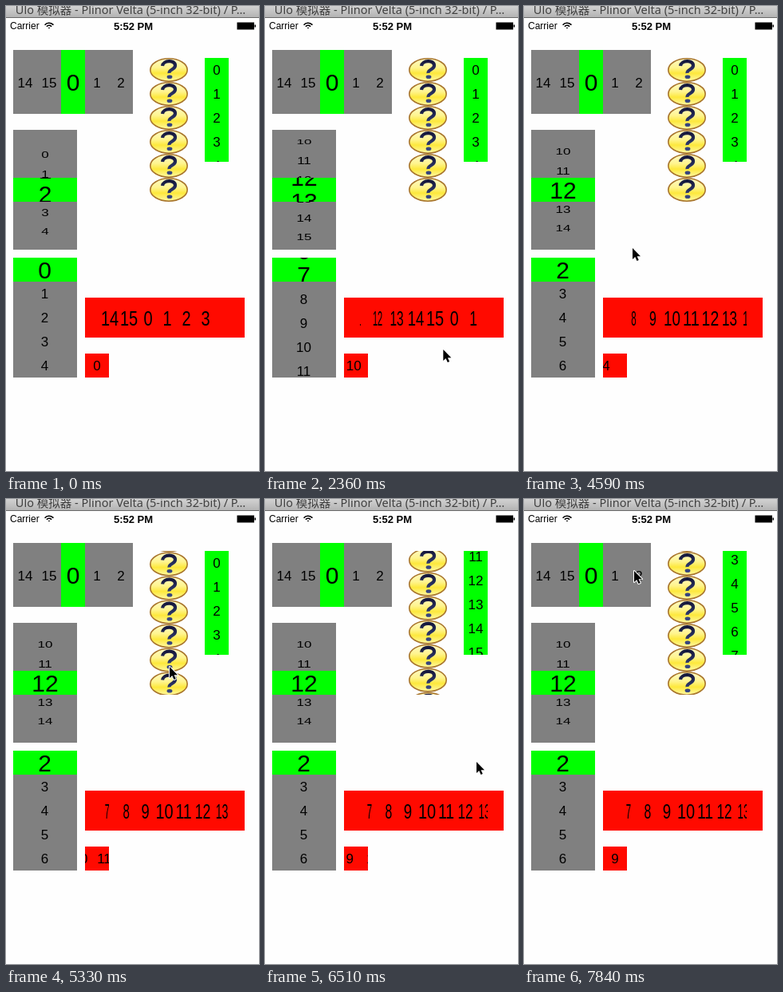
Recreate the animation shown at these times as an HTML page with a canvas. Size 317 by 582 pixels, loop 7.99 s.

```html
<!DOCTYPE html>
<html lang="en">
<head>
<meta charset="utf-8">
<title>Wheel pickers</title>
<style>
  html, body { margin: 0; width: 100%; height: 100%; overflow: hidden; background: #fefefe; }
  canvas { display: block; width: 317px; height: 582px; }
</style>
</head>
<body>
<canvas id="stage" width="317" height="582"></canvas>
<script>
const ctx = document.getElementById('stage').getContext('2d');
const LOOP = 7990, TICK = 148, COUNT = 16;
const SANS = '"Liberation Sans", Arial, sans-serif';
const GRAY = '#808080', GREEN = '#00ff00', RED = '#ff0a00';

const progress = (n, start, end) => Math.min(1, Math.max(0, (n - start) / (end - start)));

// A flick between two ticks that slows down to rest after the given distance.
const fling = (n, start, end, distance, power = 2) =>
  distance * (1 - (1 - progress(n, start, end)) ** power);

function rect(x, y, w, h, color) {
  ctx.fillStyle = color;
  ctx.fillRect(x, y, w, h);
}

function clipped(x, y, w, h, draw) {
  ctx.save();
  ctx.beginPath();
  ctx.rect(x, y, w, h);
  ctx.clip();
  draw();
  ctx.restore();
}

function label(text, x, y, size = 17, sx = 1, sy = 1) {
  ctx.save();
  ctx.translate(x, y);
  ctx.scale(sx, sy);
  ctx.font = `${size}px ${SANS}`;
  ctx.textAlign = 'center';
  ctx.fillStyle = '#000';
  ctx.fillText(text, 0, size * .36);
  ctx.restore();
}

// Calls draw(number, distance) for the endless row of numbers around pos.
function around(pos, before, after, draw) {
  for (let i = Math.ceil(pos - before); i <= pos + after; i++) {
    draw(((i % COUNT) + COUNT) % COUNT, i - pos);
  }
}

function statusBar() {
  const bar = ctx.createLinearGradient(0, 0, 0, 14);
  bar.addColorStop(0, '#d2d2d2');
  bar.addColorStop(1, '#b4b4b4');
  rect(0, 0, 317, 14, bar);
  rect(0, 14, 317, 1, '#686868');
  ctx.fillStyle = '#404040';
  ctx.textAlign = 'center';
  ctx.font = '14.5px "Noto Sans", "Noto Sans CJK SC", sans-serif';
  ctx.fillText('Ulo 模拟器 - Plinor Velta (5-inch 32-bit) / P…', 156, 9.5);

  ctx.fillStyle = '#000';
  ctx.font = `bold 13px ${SANS}`;
  ctx.fillText('5:52 PM', 159.5, 30);
  ctx.textAlign = 'left';
  ctx.font = `12px ${SANS}`;
  ctx.fillText('Carrier', 5, 29);

  ctx.strokeStyle = '#000';
  ctx.lineWidth = 1.6;
  for (let r = 1; r < 8; r += 3.1) {
    ctx.beginPath();
    ctx.arc(54, 28.5, r, -Math.PI * .77, -Math.PI * .23);
    ctx.stroke();
  }
  rect(289.5, 20.5, 21.5, 9, '#000');
  rect(311.5, 23.5, 1.5, 3, '#000');
}

function rowPicker() {
  rect(9, 55, 150, 80, GRAY);
  rect(69, 55, 30, 80, GREEN);
  around(0, 2, 2, (num, d) => label(num, 84 + 30 * d, 95.5, d ? 17 : 30));
}

// The green band shows the same numbers as the rows below it, enlarged.
function band(x, y, pos) {
  rect(9, y, 80, 30, GREEN);
  clipped(9, y, 80, 30, () => around(pos, 1.3, 1.3, (num, d) =>
    label(num, x, y + 15 + 30 * d, 30)));
}

function drumPicker(n) {
  const pos = 1.83 + fling(n, 0, 22.8, -5.83);
  rect(9, 155, 80, 150, GRAY);
  clipped(9, 155, 80, 150, () => around(pos, 2.6, 2.6, (num, d) =>
    label(num, 49, 230 + 24 * d, 17, 1, .8 * Math.cos(.3 * d))));
  band(49, 215, pos);
}

function columnPicker(n) {
  const pos = fling(n, 9.6, 25, -14);
  rect(9, 315, 80, 150, GRAY);
  clipped(9, 315, 80, 150, () => around(pos, 1, 5, (num, d) => label(num, 48.5, 330 + 30 * d)));
  band(48.5, 315, pos);
}

function redWheel(n) {
  const offset = fling(n, 10, 41, 169);
  const bend = progress(n, 10, 16);
  const centre = 208 + 34 * Math.sin(Math.PI * progress(n, 14, 32));
  rect(99, 365, 200, 50, RED);
  clipped(119, 365, 143 + 17 * bend, 50, () => around((21 - offset) / 24, 4, 4, (num, d) => {
    const x = 199 + 24 * d;
    const angle = bend * (x - centre) / 80;
    if (Math.abs(angle) < Math.PI / 2) label(num, x, 390.5, 25, .8 * Math.cos(angle), 1);
  }));
}

function redBox(n) {
  const pos = fling(n, 12, 31, -11.63, 3) + fling(n, 31, 40, -10.6, 3) + fling(n, 40, 53, -.77, 3);
  rect(99, 435, 30, 30, RED);
  clipped(99, 435, 30, 30, () => around(pos, 1, 1, (num, d) => label(num, 114 + 30 * d, 450)));
}

const hook = new Path2D('M-8 -5C-7 -12.5 8 -13 8 -5.5C8 0 0 -1 .5 4');

function ball(y) {
  ctx.save();
  ctx.translate(204, y);
  const fill = ctx.createLinearGradient(0, -14, 0, 14);
  fill.addColorStop(0, '#fffac8');
  fill.addColorStop(.4, '#fff48e');
  fill.addColorStop(.65, '#fde83c');
  fill.addColorStop(1, '#fff9a4');
  ctx.beginPath();
  ctx.ellipse(0, 0, 23.2, 14.2, 0, 0, 7);
  ctx.fillStyle = fill;
  ctx.fill();
  ctx.lineWidth = 1.6;
  ctx.strokeStyle = '#a8752c';
  ctx.stroke();

  const ink = ctx.createLinearGradient(0, -11, 0, 11);
  ink.addColorStop(0, '#16183c');
  ink.addColorStop(1, '#3a4a86');
  ctx.lineWidth = 4.2;
  ctx.strokeStyle = ink;
  ctx.stroke(hook);
  ctx.beginPath();
  ctx.ellipse(1, 8.8, 3.4, 2.3, 0, 0, 7);
  ctx.fillStyle = ink;
  ctx.fill();
  ctx.restore();
}

function ballReel(n) {
  const shift = (fling(n, 32, 40, 82) + fling(n, 40, 53, 9)) % 30;
  clipped(180, 65, 48, 180, () => {
    for (let i = -1; i < 7; i++) ball(80 + 30 * i + shift);
  });
}

function greenList(n) {
  const scroll = fling(n, 40, 69, -555);
  rect(249, 65, 30, 130, GREEN);
  clipped(249, 65, 30, 130, () => around(scroll / 30, 1, 4.3, (num, d) =>
    label(num, 264, 79.7 + 30 * d)));
}

// Stops of the pointer: tick, x, y.
const stops = [
  [0, -20, 600], [3, 40, 225], [8, 55, 420], [10, 134, 388], [14, 235, 395], [20, 190, 530],
  [23, 195, 438], [31, 136, 303], [36, 205, 210], [40, 260, 89], [44, 265, 329], [53, 138, 90]
];
const arrow = new Path2D('M0 0V14L3.2 11L5.5 16L7.8 15L5.6 10.2H10Z');

function cursor(n) {
  const next = Math.max(1, stops.findIndex(stop => stop[0] >= n));
  const [start, x0, y0] = stops[next - 1], [end, x1, y1] = stops[next];
  const k = progress(n, start, end), ease = k * k * (3 - 2 * k);
  ctx.save();
  ctx.translate(x0 + (x1 - x0) * ease, y0 + (y1 - y0) * ease);
  ctx.lineJoin = 'round';
  ctx.lineWidth = 2;
  ctx.strokeStyle = '#fff';
  ctx.stroke(arrow);
  ctx.fillStyle = '#000';
  ctx.fill(arrow);
  ctx.restore();
}

function render(time) {
  const n = Math.floor((time % LOOP) / TICK + .12);
  rect(0, 0, 317, 582, '#fefefe');
  statusBar();
  rowPicker();
  for (const part of [drumPicker, columnPicker, redWheel, redBox, ballReel, greenList, cursor]) part(n);
}

const start = performance.now();
function frame() {
  render(performance.now() - start);
  requestAnimationFrame(frame);
}
frame();
</script>
</body>
</html>
```
